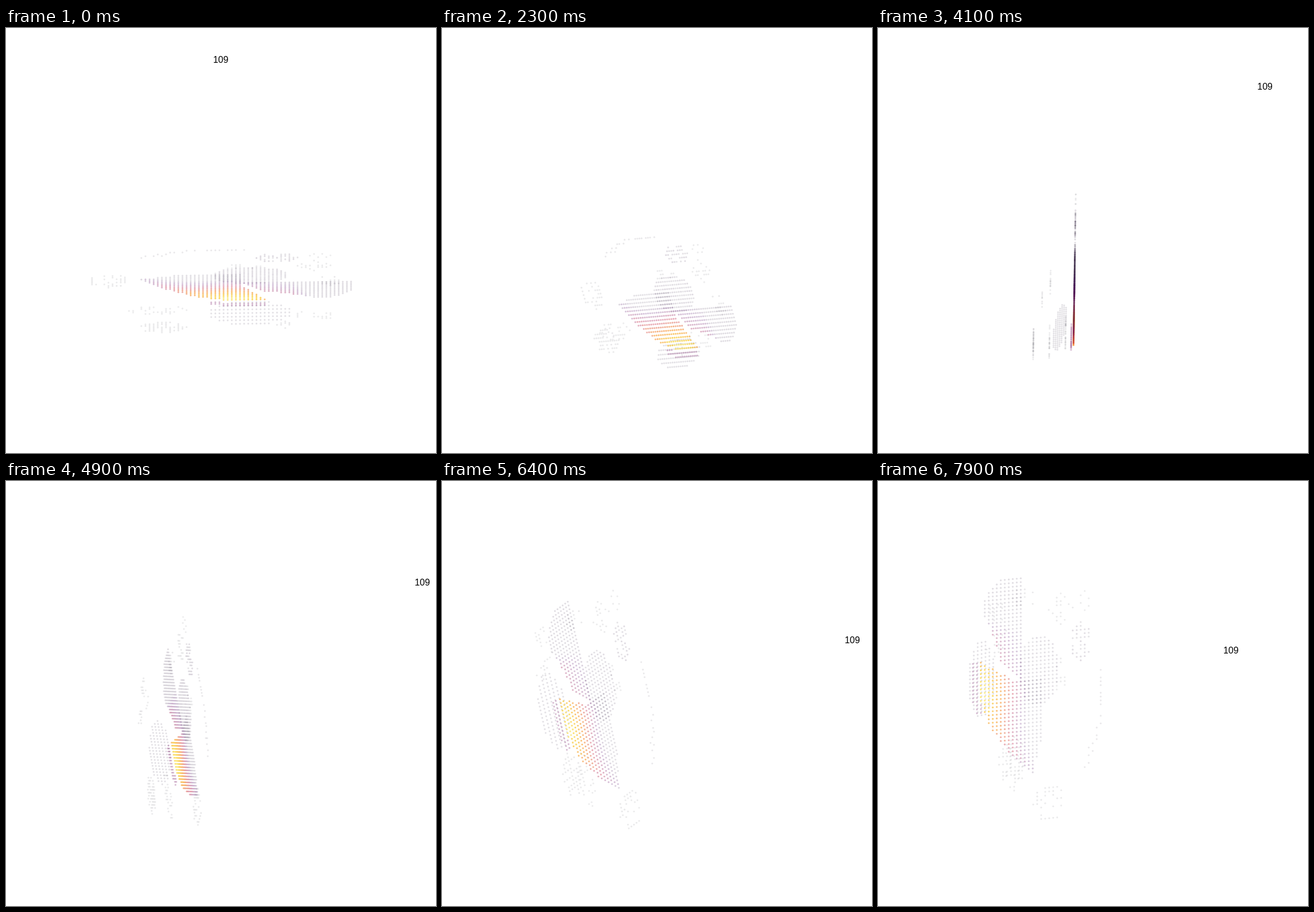
These frames come from a looping animation (753 by 744 pixels, 8000 ms). An HTML page with a canvas:

```html
<!DOCTYPE html>
<html lang="en">
<head>
<meta charset="utf-8">
<title>Rotating point cloud</title>
<style>
html, body { margin: 0; width: 100%; height: 100%; overflow: hidden; background: #fff; }
canvas { display: block; }
</style>
</head>
<body>
<canvas id="stage" width="753" height="744"></canvas>
<script>
const ctx = document.getElementById('stage').getContext('2d');

// time, origin x y, then the screen vectors of the u, v and h axes
const VIEW = [
  [0,    453, 475,  0,   -2.9, -7.2,  0.1,  0,   -6.7],
  [1300, 483, 541, -2.2, -5.2, -6,   -0.5,  3.3, -5],
  [3300, 392, 553, -0.9, -7.1, -1.35, 1.7,  6.8, -0.6],
  [4900, 290, 458,  1.35,-5.2,  0.94, 5.3,  6.8,  0.3],
  [5700, 238, 418,  3.1, -4.35, 1.5,  6.15, 6.4,  0.7],
  [7100, 183, 348,  5.8, -2.1,  1.2,  6.85, 2.6,  0.4],
  [7900, 180, 318,  7,   -0.7,  0,    6.7, -0.4, -1.4]
];
const LABEL = [
  [0, 376, 55], [1300, 428, -26], [2300, 515, -28], [3300, 607, 36], [3600, 635, 58],
  [4500, 709, 139], [4900, 729, 177], [5400, 739, 218], [5700, 738, 241],
  [6300, 723, 275], [7100, 678, 298], [7900, 618, 296]
];
const RAMP = [[10, 8, 20], [87, 16, 110], [198, 50, 84], [246, 130, 20], [248, 200, 35], [250, 245, 140]];

let seed = 109;
function rand() {
  seed = (seed * 16807) % 2147483647;
  return seed / 2147483647;
}

function colour(t) {
  t = Math.max(0, Math.min(1, t));
  const s = t * 5, i = Math.min(4, Math.floor(s));
  const rgb = RAMP[i].map((c, k) => Math.round(c + (RAMP[i + 1][k] - c) * (s - i)));
  return `rgba(${rgb},${(0.07 + 0.73 * t ** 0.9).toFixed(3)})`;
}

const dots = [];
function add(u, v, h, t) {
  dots.push({ u, v, h, fill: colour(t) });
}

// Visits lattice points inside an ellipse, keeping a share of them
function patch(cu, cv, ru, rv, h, t, share) {
  for (let u = Math.ceil(cu - ru); u <= cu + ru; u++)
    for (let v = Math.ceil(cv - rv); v <= cv + rv; v++)
      if (((u - cu) / ru) ** 2 + ((v - cv) / rv) ** 2 <= 1 && rand() < share)
        add(u, v, h, t * (0.5 + rand()));
}

// faint surroundings
patch(17, 38, 4, 5, -2, 0.01, 0.4);
patch(7, 25, 3.2, 6, -10, 0.015, 0.6);
patch(8, 26, 3, 7, -6, 0.005, 0.3);
patch(11, -16, 3, 3, 0, 0.015, 0.55);
patch(20, -12, 3, 4, 0, 0.01, 0.4);
patch(26, -13, 2, 3, 0, 0.005, 0.4);
patch(25, -3, 2.4, 5.5, 0, 0.06, 0.75);
patch(3, -5, 2, 2, -8, 0.02, 0.5);
patch(4, -13, 3, 6, -6, 0.005, 0.3);
patch(20, 5, 2, 5, 0, 0.01, 0.35);
for (let v = 5; v < 31; v++)
  if (rand() < 0.7) add(Math.round(29.5 - Math.max(0, v - 16) * 0.25 + rand()), v, 0, 0.02);
patch(14.5, 3.5, 5, 9.5, 0, 0.06, 1);

// underside
for (let u = -3; u <= 3; u++)
  for (let v = -6; v <= 13; v++)
    if ((u / 3.5) ** 2 + ((v - 3.5) / 10) ** 2 < 1) add(u, v, -3.5 + 0.5 * u, 0.05);

// far lobe and bright ridge, split by a diagonal gap
for (let v = -21; v <= 31; v++)
  for (let u = -3; u <= 15; u++) {
    const farEdge = v < -10 ? 0.5 + (v + 14) ** 2 * 0.08 : 2 + 0.3 * (v + 10);
    const far = u - farEdge;
    if (v <= 0.9 * u - 3.5 && v < 6 && far >= 0 && u <= 10) {
      const purple = 0.34 - 0.035 * far - Math.max(0, -7 - v) * 0.06;
      add(u, v, 0, Math.max(0.07, purple));
      continue;
    }
    const d = u + 0.8 - 0.019 * Math.max(0, v - 4) ** 2;
    if (v < 0 || v < Math.min(6, 0.7 * u - 0.2)) continue;
    if (d < 0 && d >= -2 && v < 14) add(u, v, -0.6, 0.26);
    else if (d >= 0 && u <= 15 - Math.max(0, v - 22) * 0.25) {
      const heat = 1.05 - 0.075 * d - 0.036 * Math.max(0, v - 9)
        - 0.22 * Math.exp(-v / 2) - (d < 1 ? 0.12 : 0);
      add(u, v, 0, Math.max(0.05, heat));
    }
  }

// Smooth curve through rows of [time, values...]
function sample(keys, time) {
  let i = 0;
  while (i < keys.length - 2 && time > keys[i + 1][0]) i++;
  const a = keys[i], b = keys[i + 1], span = b[0] - a[0];
  const x = Math.min(1, (time - a[0]) / span);
  const slope = (n, k) => {
    const p = keys[Math.max(0, n - 1)], q = keys[Math.min(keys.length - 1, n + 1)];
    return (q[k] - p[k]) / (q[0] - p[0]) * span;
  };
  return a.slice(1).map((from, j) => {
    const k = j + 1, to = b[k], m = slope(i, k), n = slope(i + 1, k);
    return from + x * (m + x * (3 * (to - from) - 2 * m - n + x * (2 * (from - to) + m + n)));
  });
}

function draw(time) {
  ctx.fillStyle = '#fff';
  ctx.fillRect(0, 0, 753, 744);
  const [x, y, ux, uy, vx, vy, hx, hy] = sample(VIEW, time);
  for (const { u, v, h, fill } of dots) {
    ctx.fillStyle = fill;
    ctx.beginPath();
    ctx.arc(x + u * ux + v * vx + h * hx, y + u * uy + v * vy + h * hy, 1.6, 0, 7);
    ctx.fill();
  }
  const [lx, ly] = sample(LABEL, time);
  ctx.fillStyle = '#000';
  ctx.font = '16px "Liberation Sans", Arial, sans-serif';
  ctx.textAlign = 'center';
  ctx.fillText('109', lx, ly + 5.5);
}

const start = performance.now();
function tick() {
  const time = (performance.now() - start) % 8000;
  draw(Math.floor(time / 100) * 100);
  requestAnimationFrame(tick);
}
tick();
</script>
</body>
</html>
```
